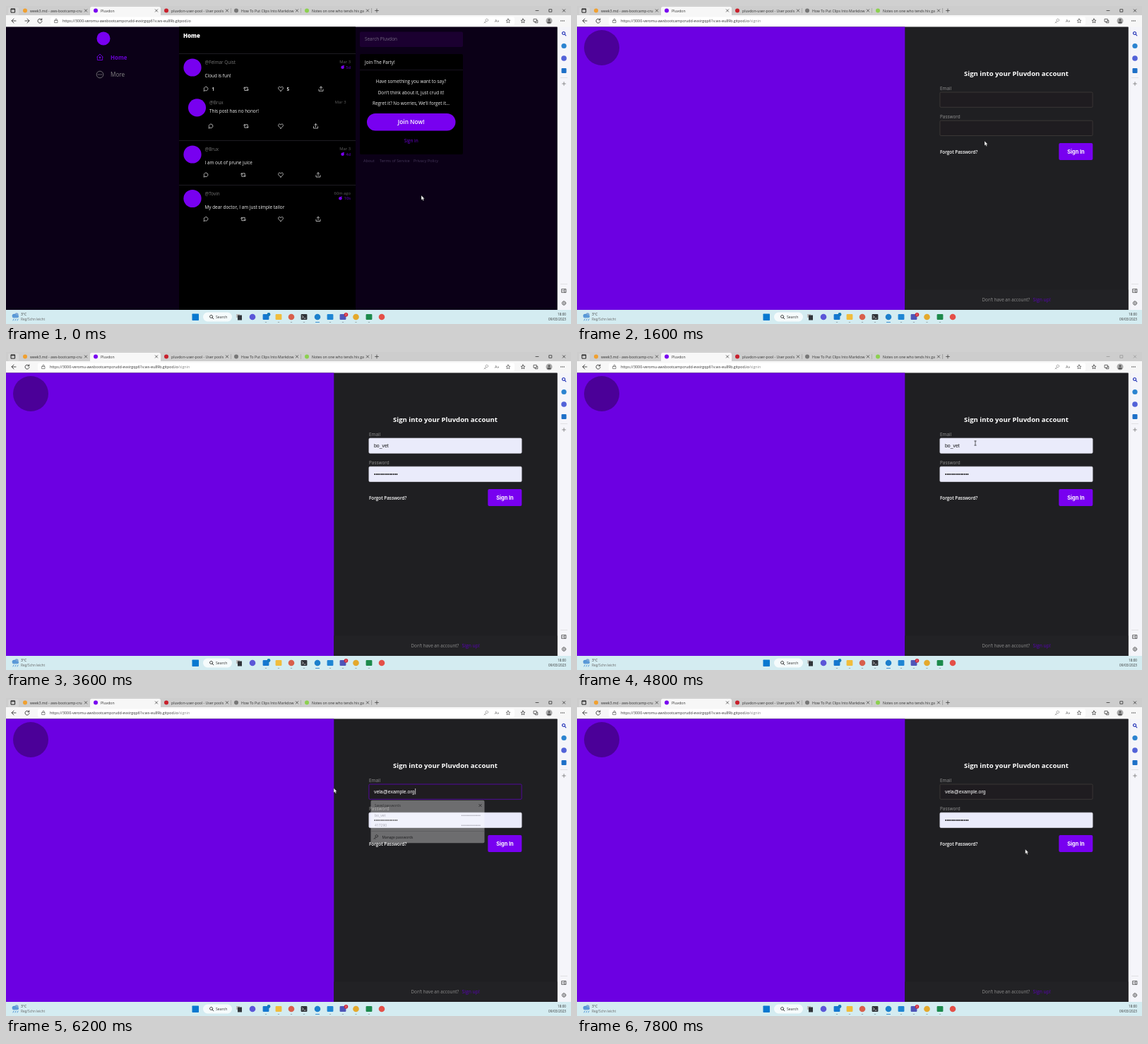
Write an HTML page that moves like this. It is 800 px wide and 450 px high and loops after 8000 ms.

```html
<!DOCTYPE html>
<html lang="en">
<head>
<meta charset="utf-8">
<title>Sign in walkthrough</title>
<style>
  html, body { margin: 0; width: 100%; height: 100%; overflow: hidden; background: #000; }
  svg { display: block; width: 100vw; height: 100vh; font-family: "Open Sans", "Noto Sans", sans-serif; }
  .field { font-family: "Liberation Sans", Arial, sans-serif; }
  .button { font-family: Inter, "Open Sans", sans-serif; }
  .line { fill: none; stroke-linecap: round; stroke-linejoin: round; }
</style>
</head>
<body>
<svg id="stage" viewBox="0 0 800 450"></svg>
<script>
const LOOP = 8000, STEP = 200;
const SPLIT = 464.3, EDGE = 780.5, TOP = 29.5;
const VIOLET = '#7800f0', HOST = 'https://3000-veromu-awsbootcampcrudd-evxirgqp61v.ws-eu89b.gitpod.io';
const EMAIL = 'vela@example.org', DOTS = '•'.repeat(14);

// Drawing helpers
const rect = (x, y, w, h, fill, more = '') =>
  `<rect x="${x}" y="${y}" width="${w}" height="${h}" fill="${fill}" ${more}/>`;
const circle = (x, y, r, fill, more = '') => `<circle cx="${x}" cy="${y}" r="${r}" fill="${fill}" ${more}/>`;
const text = (x, y, value, size, fill, more = '') =>
  `<text x="${x}" y="${y}" font-size="${size}" fill="${fill}" ${more}>${value}</text>`;
const line = (d, stroke, width = 0.8, x = 0, y = 0) =>
  `<path class="line" d="${d}" stroke="${stroke}" stroke-width="${width}" transform="translate(${x} ${y})"/>`;
const group = (id, body, more = '') => `<g id="${id}" ${more}>${body}</g>`;
const END = ' text-anchor="end"', MID = ' text-anchor="middle"', BOLD = ' font-weight="700"', SEMI = ' font-weight="600"';

const ICON = {
  comment: 'M-2.8 2.8L-2.5.9A2.8 2.8 0 1 1-.9 2.5Z',
  repost: 'M-3.4-1L-2.2-2.4L-1-1M-2.2-2.2V2.2H1M-.8-2.2H2.2V2.2M1 1L2.2 2.4L3.4 1',
  heart: 'M0 3C-2 1.5-3.4.2-3.4-1.2C-3.4-3.3-.9-3.6 0-1.8C.9-3.6 3.4-3.3 3.4-1.2C3.4.2 2 1.5 0 3Z',
  share: 'M-3 .6V3H3V.6M0 1.2V-3.2M-1.7-1.6L0-3.3L1.7-1.6',
  back: 'M3 0H-3L0-3M-3 0L0 3',
  forward: 'M-3 0H3L0-3M3 0L0 3',
  reload: 'M2.6-1.4A3 3 0 1 0 3 .6M2.8-3.2V-1.2H.8',
  lock: 'M-2-.6H2V2.6H-2ZM-1.2-.6V-1.6A1.2 1.2 0 0 1 1.2-1.6V-.6',
  star: 'M0-3L.9-.9L3-.7L1.4.7L1.9 2.8L0 1.7L-1.9 2.8L-1.4.7L-3-.7L-.9-.9Z',
  cross: 'M-1.7-1.7L1.7 1.7M1.7-1.7L-1.7 1.7',
  plus: 'M-2.4 0H2.4M0-2.4V2.4',
  lens: 'M1 .9A2 2 0 1 1 1-1.9A2 2 0 0 1 1 .9L2.8 2.8',
  pages: 'M-2.6-2.6H1.2V1.2H-2.6ZM-.8 1.2V2.8H2.8V-.8H1.2',
  key: 'M-.4.4L-3 3M-2 2L-1 3M2.6-1A1.8 1.8 0 1 1 2.6-1.1',
  house: 'M-4.2-.4L0-4.4L4.2-.4M-3.6-.8V4H3.6V-.8'
};
const icon = (name, x, y, stroke = '#444', width = 0.8) => line(ICON[name], stroke, width, x, y);

function browser() {
  const tabs = [
    [27, 'week3.md - aws-bootcamp-cru', '#f0a030'], [127, 'Pluvdon', VIOLET],
    [227, 'pluvdon-user-pool - User pools', '#c8202c'], [326, 'How To Put Clips Into Markdow', '#777'],
    [426, 'Notes on one who tends his ga', '#8cd050']
  ];
  let s = rect(0, 0, 800, 14, '#cdcdcd') + rect(0, 13, 800, 17, '#f7f7f7') +
    rect(119, 1, 100, 14, '#f7f7f7', 'rx="2.5"') + rect(3, 2, 15, 11, '#d6d6d6', 'rx="2"') +
    line('M-2.6-2.6H2.6V2.6H-2.6ZM-2.6-1.6H2.6', '#222', 1, 10, 6.5);
  tabs.forEach(([x, label, color], i) => {
    s += circle(x, 6.5, 3, color) + text(x + 7, 8.6, label, 5.15, '#333') + icon('cross', x + 86, 6.5, '#333', 0.7);
    if (i > 1) s += rect(x + 91, 3, 0.6, 7, '#999');
  });
  s += icon('plus', 525, 6.5, '#333', 0.7) + rect(517.5, 3, 0.6, 7, '#999');
  s += group('controls', line('M-2 0H2', '#222', 0.7, 752, 6.5) +
    line('M-1.8-1.8H1.8V1.8H-1.8Z', '#222', 0.7, 771, 6.5) + icon('cross', 790, 6.5, '#222', 0.7));
  s += rect(39, 15.5, 681, 11.5, '#fff', 'rx="2" id="address"');
  s += icon('key', 680, 21, '#888', 0.7) + text(692, 23, 'A»', 5.5, '#555') + icon('star', 711, 21, '#555', 0.7) +
    icon('star', 732, 21, '#333', 0.7) + icon('pages', 750, 21, '#333', 0.7) +
    circle(769, 21, 4.5, '#aaa') + circle(769, 19.7, 1.5, '#555') + rect(766.5, 22, 5, 2.5, '#555', 'rx="1.2"');
  for (let i = -1; i < 2; i++) s += circle(788 + i * 2.2, 21, 0.65, '#333');
  s += rect(EDGE, TOP, 20, 401, '#f5f5fa') + icon('lens', 790, 39, '#2535b8', 1.2) +
    circle(790, 56.5, 3.6, '#2b83d0') + circle(790, 74, 3.8, '#5262d8') + rect(786.5, 88, 7, 7, '#1e70c8', 'rx="1"') +
    rect(785, 101, 10, 0.5, '#ccc') + icon('plus', 790, 110, '#666', 0.7) + rect(785, 393, 10, 0.5, '#ccc') +
    line('M-3-2.4H3V2.4H-3ZM1-2.4V2.4M-2 0H0', '#333', 0.7, 790, 403) +
    circle(790, 420.5, 2.6, 'none', 'stroke="#333" stroke-width="1" stroke-dasharray="1.7 .35"') +
    circle(790, 420.5, 1, 'none', 'stroke="#333" stroke-width=".6"');
  return s;
}

const navigation = (reloadX, lockX, path) => icon('back', 11, 21, '#222') + icon('reload', reloadX, 21, '#222') +
  icon('lock', lockX, 21, '#444', 0.6) +
  text(lockX + 9, 23, `${HOST}<tspan fill="#888">${path}</tspan>`, 5.3, '#333');

function actions(y, xs, counts = []) {
  return ['comment', 'repost', 'heart', 'share'].map((name, i) =>
    icon(name, xs[i], y, '#d5d5d5') + (counts[i] ? text(xs[i] + 8.5, y + 2.6, counts[i], 6.3, '#ddd', BOLD) : '')).join('');
}

function post(x, y, name, message, age, left, gap = 19) {
  const right = x + (left ? 224 : 211);
  let s = circle(x, y, 12.6, VIOLET) + text(x + 17.5, y - 5, '@' + name, 6.35, '#777') +
    text(x + 17.5, y - 5 + gap, message, 6.4, '#f2f2f2') + text(right, y - 6, age, 5.8, '#606060', END);
  if (left) {
    const ix = right - left.length * 3.2 - 5;
    s += text(right, y + 1.7, left, 5.7, '#6d00d8', END) +
      circle(ix, y - 0.3, 2.3, VIOLET) + line('M-1-1L1.8-2.6', VIOLET, 1.2, ix, y);
  }
  return s;
}

function home() {
  let s = icon('forward', 30, 21, '#222') + navigation(48, 71, '') +
    rect(0, TOP, EDGE, 401, '#0b0017') + rect(245, TOP, 250, 401, '#000') +
    circle(138, 46, 9.5, VIOLET) + icon('house', 133, 72.5, '#6800d0', 1) + circle(133, 73, 1.4, '#6800d0') +
    text(148, 75.6, 'Home', 7.9, '#6800d0', BOLD) +
    circle(133, 97, 4.8, 'none', 'stroke="#858585" stroke-width=".8"') + text(148, 100.2, 'More', 8.2, '#858585');
  for (let i = -1; i < 2; i++) s += circle(133 + i * 2.2, 97, 0.65, '#858585');
  s += text(251, 45.4, 'Home', 7.9, '#fff', 'font-weight="800"');
  for (const y of [67, 190, 253]) s += rect(245, y, 250, 0.8, '#25222b');
  s += post(264, 87, 'Felmar Quist', 'Cloud is fun!', 'Mar 3', '5d') + actions(117.3, [283, 340, 389, 446], ['1', '', '5']) +
    post(270.5, 143.8, 'Brux', 'This post has no honor!', 'Mar 3', '', 11.7) + actions(170, [290, 340, 389, 438.5]) +
    post(264, 210, 'Brux', 'I am out of prune juice', 'Mar 3', '4d') + actions(239, [283, 336, 389, 442]) +
    post(264, 272.5, 'Tovin', 'My dear doctor, I am just simple tailor', '60m ago', '10s') + actions(301.5, [283, 336, 389, 442]);
  s += rect(501, 36.5, 146, 21.5, '#1b0030', 'rx="2"') + text(508, 49.3, 'Search Pluvdon', 6.4, '#756a82') +
    rect(501, 68, 146, 142, '#000', 'rx="2"') + rect(501, 90, 146, 0.8, '#1c1526') +
    text(508, 81.6, 'Join The Party!', 6.4, '#f0f0f0');
  ['Have something you want to say?', 'Don’t think about it, just crud it!', 'Regret it? No worries, We’ll forget it…']
    .forEach((row, i) => s += text(573.5, 109 + i * 15.6, row, 6.4, '#eee', MID));
  s += rect(511, 152, 125.5, 24.5, VIOLET, 'rx="12.2"') + text(573.7, 167.3, 'Join Now!', 8.3, '#fff', MID + SEMI) +
    text(573.7, 193.4, 'Sign in', 6.5, '#6d00d8', MID);
  [[506, 'About'], [529, 'Terms of Service'], [577, 'Privacy Policy']]
    .forEach(([x, label]) => s += text(x, 221, label, 5.6, '#45365a'));
  return s + group('status', rect(-2, 421.3, 185.5, 11, '#d9d9d9', 'rx="2"') + text(2, 428, HOST + '/signin', 4.65, '#333'));
}

const input = (id, y) => rect(513.9, y, 216.2, 21.3, '#1f1b20', `id="${id}Box" rx="1.5" stroke-width=".7"`) +
  text(521, y + 12.6, '', 6.9, '#000', `id="${id}Text" class="field"`);

function signIn() {
  return navigation(30, 53, '/signin') + rect(0, TOP, EDGE, 401, '#1f1f22') + rect(0, TOP, SPLIT, 401, '#6c00e2') +
    rect(SPLIT, 401.5, EDGE - SPLIT, 29, '#222225') + circle(35, 59, 25, '#4b0098') +
    text(622, 98.8, 'Sign into your Pluvdon account', 9.55, '#fff', MID + BOLD) +
    text(514, 118.6, 'Email', 6.4, '#949494') + text(514, 159, 'Password', 6.4, '#949494') +
    input('email', 122) + rect(521, 127, 21, 10, '#3390ff', 'id="selection" opacity=".5"') +
    rect(579.4, 128, 0.7, 8.4, '#fff', 'id="caret"') + input('password', 162.2) +
    text(514, 208.8, 'Forgot Password?', 6.3, '#fff', SEMI) +
    rect(682.3, 194, 48, 24, VIOLET, 'rx="2"') +
    text(706.4, 208.7, 'Sign In', 7.4, '#fff', MID + BOLD + ' class="button"') +
    text(573.5, 418.4, 'Don’t have an account?', 6.3, '#8e8e8e') + text(645.5, 418.4, 'Sign up!', 6.8, '#5a00b8') +
    group('popup', rect(516.5, 144.7, 161, 60.5, '#fff', 'rx="2"') + rect(516.5, 188, 161, 0.5, '#aaa') +
      text(522, 154, 'Saved passwords', 4.6, '#444') + icon('cross', 671.5, 152, '#111', 0.7) +
      ['bo_vet', '417290'].map((user, i) => text(522, 168 + i * 13.5, user, 5, '#222') +
        text(672, 168 + i * 13.5, DOTS, 5.6, '#222', END + ' class="field"')).join('') +
      icon('key', 524, 196.5, '#111', 0.7) + text(532.5, 198.8, 'Manage passwords', 4.9, '#111'));
}

function taskbar() {
  const apps = [[349, '#5b57d8'], [368, '#1478d0'], [386, '#f0bd3c'], [404, '#d8604c'], [422, '#2f3338'], [441, '#1c80cc'],
    [459, '#1f86d4'], [477, '#4e55b8'], [495.5, '#e4a92c'], [514, '#1c8a4c'], [532, '#e45048']];
  const round = [349, 404, 441, 495.5, 532];
  let s = rect(0, 430, 800, 20, '#d4ecf1') + rect(263.5, 435.5, 9.5, 9.5, '#0878d0', 'rx=".7"') +
    rect(279, 433.5, 41, 13, '#f5fbfc', 'rx="6.5"') + icon('lens', 291, 440, '#222', 0.9) +
    text(297, 442, 'Search', 5.2, '#333') + rect(326, 436, 5, 5, '#bbb') + rect(328, 437.5, 6, 7, '#30343a');
  for (const [x, color] of apps) {
    const active = x === 441, w = active ? 6 : 2.4;
    s += round.includes(x) ? circle(x, 440, 4.3, color) : rect(x - 4.4, 436, 8.8, 8, color, 'rx="1"');
    if (x > 350 && x < 530) s += rect(x - w / 2, 447.2, w, 0.9, active ? '#0870c8' : '#85949a', 'rx=".4"');
  }
  s += line('M-2.5-1.5L-.8 0L-2.5 1.5M0 2H2', '#fff', 0.7, 422, 440) +
    circle(372, 436.5, 2.4, '#1478b8') + circle(481.5, 436.7, 2.8, '#d02838') + text(481.5, 438.2, '2', 4, '#fff', MID);
  s += circle(15, 437, 2.7, '#7ca8d8') + circle(11.5, 438.5, 2.8, '#4f92d4') + rect(9, 437.5, 9, 3.8, '#5c9ad8', 'rx="1.8"') +
    line('M-2 0L-3 2M1 0L0 2M4 0L3 2', '#3482d0', 0.8, 13, 443);
  return s + text(21, 438.4, '3°C', 5, '#333') + text(21, 445, 'Reg/Schn leicht', 4.8, '#666') +
    text(793, 438.4, '18:00', 4.7, '#333', END) + text(793, 445, '09/03/2023', 4.7, '#333', END);
}

const pointers = group('arrow', '<path d="M0 0V6.5L1.5 5.2L2.5 7.4L3.7 6.9L2.7 4.8L4.6 4.7Z" fill="#fff" stroke="#222" stroke-width=".4"/>') +
  group('hand', '<path d="M1.6 1Q2.3-.2 3 1V3.2L5.8 4Q6.5 4.4 6.2 6L5.6 9H2.4L0 5.7Q.2 4.5 1.6 5.5Z" fill="#fff" stroke="#222" stroke-width=".5"/>') +
  group('beam', line('M-1.2-3H1.2M0-3V3M-1.2 3H1.2', '#222', 0.7));

const stage = document.getElementById('stage');
stage.innerHTML = browser() + group('home', home()) + group('signin', signIn()) + taskbar() + pointers;
const $ = id => document.getElementById(id);
const show = (id, on) => $(id).setAttribute('visibility', on ? 'inherit' : 'hidden');

// time, x, y, pointer shape from then on
const path = [
  [0, 588, 268, 'arrow'], [400, 588, 268, 'arrow'], [1000, 575, 190.5, 'hand'], [1400, 575, 190.5, 'hand'],
  [1600, 577, 191, 'arrow'], [2600, 577, 191, ''], [4400, 590, 141, 'beam'], [4800, 564, 129, 'beam'],
  [5000, 564, 129, 'beam'], [5400, 464, 127.5, 'arrow'], [6400, 464, 127.5, 'arrow'],
  [7400, 634.7, 214, 'arrow'], [LOOP, 634.7, 214, 'arrow']
];

function movePointer(t) {
  const i = path.findLastIndex(key => key[0] <= t), [t0, x0, y0, shape] = path[i], [t1, x1, y1] = path[i + 1];
  const p = (t - t0) / (t1 - t0), ease = p * p * (3 - 2 * p);
  for (const id of ['arrow', 'hand', 'beam']) show(id, id === shape);
  if (shape) $(shape).setAttribute('transform', `translate(${x0 + (x1 - x0) * ease} ${y0 + (y1 - y0) * ease})`);
}

function setField(id, value, filled, focused) {
  const box = $(id + 'Box'), label = $(id + 'Text');
  box.setAttribute('fill', filled ? '#eaebfb' : '#1f1c20');
  box.setAttribute('stroke', focused ? '#6900d0' : filled ? '#dcdce8' : '#47433e');
  label.setAttribute('fill', filled ? '#111' : '#fff');
  label.textContent = value;
}

function render(now) {
  const t = Math.floor(now % LOOP / STEP) * STEP;
  const signing = t >= 1600, saved = t >= 2200, typing = t >= 5400, focused = t >= 5000 && t < 6400;
  show('home', !signing);
  show('signin', signing);
  show('status', !signing && t >= 1200);
  $('address').setAttribute('x', signing ? 45 : 63);
  $('address').setAttribute('width', signing ? 675 : 657);
  $('controls').setAttribute('opacity', t >= 4000 && t < 5000 ? 0.35 : 1);
  const typed = EMAIL.slice(0, Math.max(0, (t - 5200) / STEP * 4));
  setField('email', typing ? typed : saved ? 'bo_vet' : '', saved && !typing, focused);
  setField('password', saved ? DOTS : '', saved, false);
  show('selection', t === 5200);
  show('caret', t >= 6000 && t < 6400);
  show('popup', t >= 5200 && t < 6400);
  $('popup').setAttribute('opacity', t < 6200 ? 0.97 : 0.35);
  movePointer(t);
}

const start = performance.now();
(function frame() {
  render(performance.now() - start);
  requestAnimationFrame(frame);
})();
</script>
</body>
</html>
```
